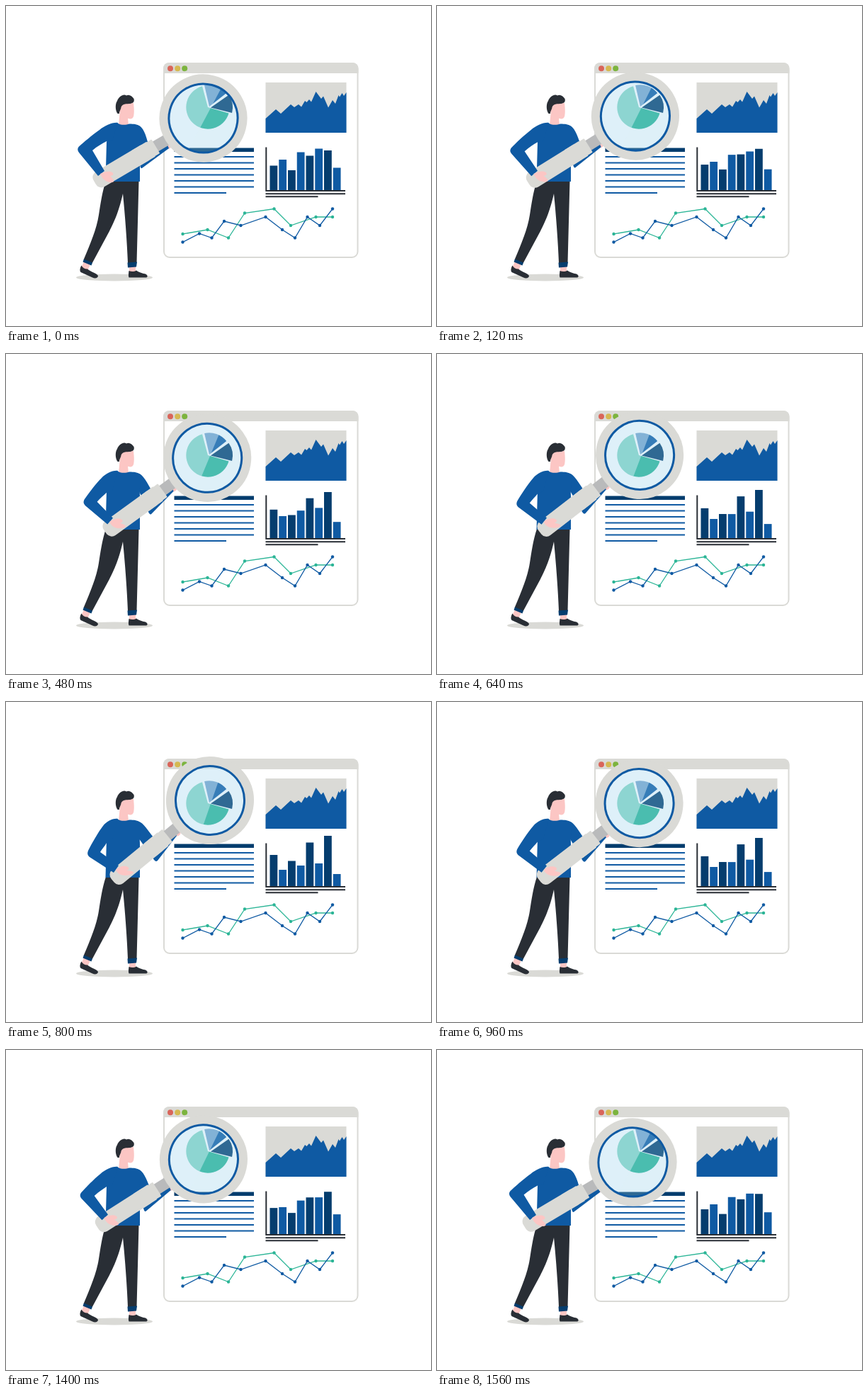
Recreate the animation shown at these times as an HTML page. Size 600 px wide and 452 px high, loop 1.6 s.

```html
<!DOCTYPE html>
<html lang="en">
<head>
<meta charset="utf-8">
<title>Data analysis</title>
<style>
  html, body { margin: 0; width: 100%; height: 100%; overflow: hidden; background: #fff; }
  svg { display: block; width: 100%; height: 100%; }
  .blue { fill: #0f5aa3; }
  .navy { fill: #053d6e; }
  .dark { fill: #292e35; }
  .grey { fill: #dadad6; }
  .skin { fill: #fcc6c4; }
  .teal { fill: #2bb596; }
  .rule { fill: none; stroke: #0f5aa3; stroke-width: 2; }
  .axis { fill: none; stroke: #292e35; stroke-width: 2; }
</style>
</head>
<body>
<svg viewBox="0 0 600 452">
  <!-- browser window -->
  <rect x="223" y="81" width="273.5" height="274" rx="8" fill="#fff" stroke="#dadad6" stroke-width="2"/>
  <path class="grey" d="M222 95V88a8 8 0 0 1 8-8H489.500a8 8 0 0 1 8 8V95Z"/>
  <circle cx="232" cy="88.200" r="4" fill="#d9655a"/>
  <circle cx="242.200" cy="88.200" r="4" fill="#d5b951"/>
  <circle cx="252.200" cy="88.200" r="4" fill="#7cb43e"/>

  <!-- area chart -->
  <rect class="grey" x="366.500" y="108" width="114" height="71"/>
  <path class="blue" d="M366.500 179V159L381 146L388 152L402 139L407 143L413 139L417 142.500L422 134L424.500 136L428 132L431 135.500L437.500 121L445 131L448 127.500L455 143.500L461 133L465 138L469.500 126L471 128.500L474.500 123L477 127L480.500 122V179Z"/>

  <!-- text block -->
  <rect class="navy" x="237.500" y="200.500" width="112.500" height="5.500"/>
  <path class="rule" d="M237.500 213H350M237.500 221.500H350M237.500 230H350M237.500 238.500H350M237.500 247H350M237.500 255.500H350M237.500 264H311"/>

  <!-- bar chart -->
  <g id="bars"></g>
  <path class="axis" d="M367.300 199.500V261H479M366.500 265.300H479M366.500 269.200H440.500"/>

  <g id="lines"></g>
  <g id="pie"></g>

  <!-- man -->
  <ellipse class="grey" cx="153" cy="383.500" rx="54" ry="5"/>
  <path class="skin" d="M110 361L119 365L115 374L106 370ZM174 367H183V376H174Z"/>
  <path class="dark" d="M106.500 366.500C104 371 104 374 105.500 376L122 383.500C126 385.500 130 384 130 381C128 377 120 376 115 371.500C111 371.500 108 369.500 106.500 366.500Z"/>
  <path class="dark" d="M173.500 374C173 378 172.500 381 173.500 383.500H198C200.500 383 200 380 197 378.500C192 377.500 187 376 184 373.500C181 375.500 177 375.500 173.500 374Z"/>
  <path class="dark" d="M141 247H187.500L184.500 363H172C171 335 168 295 165 265C159 292 152 306 146 318L121.500 363.500L109.500 358.500C119 336 128 315 131 295C134 276 136 262 141 247Z"/>
  <path class="navy" d="M110 357.500L122 362.500L120.500 366.500L108.500 361.500ZM171.500 362.500L185 361.500L184 368.500L172 369.500Z"/>
  <circle id="farHand" class="skin" r="5"/>
  <path id="farArm" class="blue"/>
  <path class="skin" d="M160 145L164 138L180 137C181 146 181 152 180 156C179 160 174 160 172 158.500L173 168H159L160.500 152Z"/>
  <path class="dark" d="M157.500 152C154 147 154 138 157 134C159 128 166 123.500 170 126.500C174 124.500 178 127.500 180.500 131C182 136 178 138 174 138C168 138.500 164 138.500 162.500 143C162 147 159.500 149 160 152Z"/>
  <path class="blue" d="M157 165C161 168.500 169 168.500 174 166.500C181 166.500 186 167 190 171C191 180 188 188 189 200V248H140.500L142 192L148 172Z"/>

  <!-- magnifier -->
  <g id="glass">
    <rect x="-82" y="-8" width="24" height="16" fill="#b9babb"/>
    <rect class="grey" x="-92" y="-11.500" width="14" height="23" rx="1"/>
    <rect class="grey" x="-178" y="-12.300" width="90" height="24.600" rx="9"/>
    <rect class="grey" x="-110" y="-12.300" width="24" height="24.600"/>
    <circle r="55.500" fill="none" stroke="#dadad6" stroke-width="13"/>
    <circle r="48" fill="#91cde8" fill-opacity=".3"/>
    <path fill="#dcf0f8" fill-opacity=".46" d="M41.700 -22.600A47.500 47.500 0 1 0 -39.100 26.800Z"/>
    <circle r="48.500" fill="none" stroke="#0f5aa3" stroke-width="3"/>
  </g>
  <path id="nearArm" class="blue"/>
  <path id="nearHand" class="skin"/>
</svg>
<script>
const LOOP = 1600, HALF = LOOP / 2, STEP = 40;
const $ = id => document.getElementById(id);
const mix = (a, b, p) => a + (b - a) * p;

function add(parent, tag, attrs) {
  const el = document.createElementNS('http://www.w3.org/2000/svg', tag);
  for (const k in attrs) el.setAttribute(k, attrs[k]);
  return parent.appendChild(el);
}

// Blend two path strings that share the same commands
function morph(a, b, p) {
  const to = b.match(/[\d.]+/g);
  let i = 0;
  return a.replace(/[\d.]+/g, n => mix(+n, +to[i++], p).toFixed(2));
}

// Pie slices: class, centre, radius, start and end angle
for (const [cls, x, y, r, from, to] of [
  ['teal', 285, 143, 30.7, 16, 255],
  ['blue', 287, 142, 30.7, 257, 322],
  ['navy', 289, 143.5, 31, -35, 14]
]) {
  const at = deg => {
    const a = deg * Math.PI / 180;
    return `${x + r * Math.cos(a)} ${y + r * Math.sin(a)}`;
  };
  add($('pie'), 'path', {
    class: cls,
    d: `M${x} ${y}L${at(from)}A${r} ${r} 0 ${+(to - from > 180)} 1 ${at(to)}Z`
  });
}

// Line charts
function lineChart(color, points) {
  add($('lines'), 'polyline', { points: points.join(' '), fill: 'none', stroke: color, 'stroke-width': 1.3 });
  for (const [cx, cy] of points) add($('lines'), 'circle', { cx, cy, r: 2.2, fill: color });
}
lineChart('#2bb596', [[249.5, 322], [284.5, 316], [314, 327.5], [337, 292.5],
  [378.5, 286.5], [402, 310], [437.5, 298], [461, 298]]);
lineChart('#0f5aa3', [[249.5, 333.5], [273, 321.5], [290.5, 327.5], [308, 304], [331.5, 310],
  [366.5, 298], [390, 316], [408, 327.5], [425.5, 298], [443, 310], [461, 286.5]]);

// Bar tops at both ends of the swing
const tops = [[225.5, 216], [217, 237], [232, 224.5], [206.5, 231],
  [211.5, 198.5], [201.5, 228], [204, 189], [228.5, 243]];
const bars = tops.map((_, i) => add($('bars'), 'rect', {
  class: i % 2 ? 'blue' : 'navy', x: 372.5 + i * 12.75, width: 10.8
}));

const limbs = {
  farArm: [
    'M184 168C191 168 196 176 200 192L208 200L226 192L230 201L192 229C190 230 189 226 189 220L186 190Z',
    'M184 168C192 168 197 177 208 191L216 203L238 181L241 189L214 224C212 226 210 225 207 220L187 192Z'
  ],
  nearArm: [
    'M158 165C150 164 140 169 132 175C122 182 109 193 102.5 199C100.5 202 101 204 103 207L130 240L139 233L122 204C129 198 136 194 142 191L150 190Z',
    'M158 165C150 164 142 169 137 175C130 184 121 200 116 210C114.5 214 115 216 118 219L152 241L159 231L133 212C136 207 139 204 142 199L150 195Z'
  ],
  nearHand: [
    'M133 237C141 233 147 233 150 235C153 237 151 240 147 240C150 243 153 246 152 248C150 250 146 249 143 248C138 246 135 242 133 237Z',
    'M155 237C161 231 168 231 172 233C175 235 173 237 170 238C176 239 181 239 180 241C178 244 172 245 168 245C162 245 157 242 155 237Z'
  ]
};

// Lens pose: x, y, tilt. The way back ends a little further left.
const start = [278.5, 158.5, 30.6], peak = [288, 139, 39.5], end = [275.9, 159.5, 30.3];

function draw(t) {
  const rising = t < HALF;
  const p = rising ? t / HALF : (LOOP - t) / HALF;
  const [x, y, tilt] = (rising ? start : end).map((v, i) => mix(v, peak[i], p));
  $('glass').setAttribute('transform', `translate(${x} ${y}) rotate(${-tilt})`);

  bars.forEach((bar, i) => {
    const top = mix(...tops[i], p);
    bar.setAttribute('y', top);
    bar.setAttribute('height', 260.5 - top);
  });

  for (const id in limbs) $(id).setAttribute('d', morph(...limbs[id], p));
  $('farHand').setAttribute('cx', mix(228.5, 241.5, p));
  $('farHand').setAttribute('cy', mix(197, 184.5, p));
}

const begin = performance.now();
function tick() {
  const t = (performance.now() - begin) % LOOP;
  draw(Math.floor(t / STEP) * STEP);
  requestAnimationFrame(tick);
}
tick();
</script>
</body>
</html>
```
